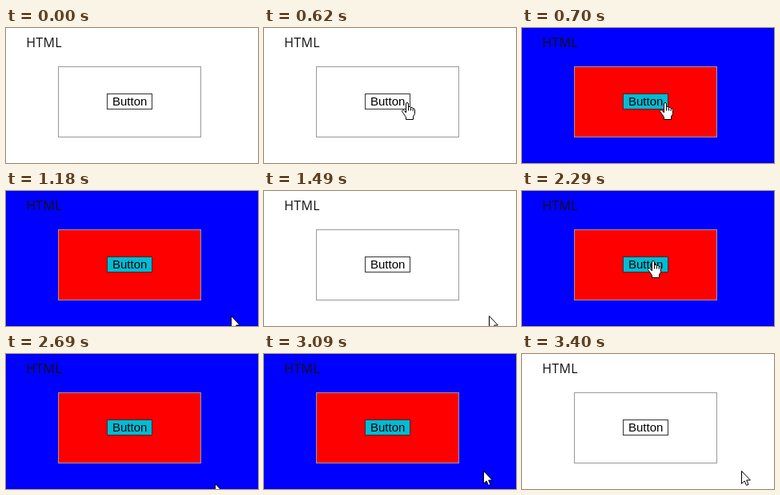
Animation, 315 px wide and 169 px high, one loop 3550 ms. Source, as an HTML page:

```html
<!DOCTYPE html>
<html lang="en">
<head>
<meta charset="utf-8">
<title>Button toggles colours</title>
<style>
  html, body { margin: 0; width: 100%; height: 100%; overflow: hidden; background: #fff; }
  svg { display: block; width: 315px; height: 169px; }
  .frame { fill: #fff; stroke: #999; }
  .button { fill: #fff; stroke: #333; }
  .label { font: 15px "Liberation Sans", Arial, sans-serif; fill: #000; }
  .title { font: 16px "Open Sans", "Noto Sans", sans-serif; letter-spacing: .3px; fill: #111; }
  .pointer path { fill: #fff; stroke: #000; stroke-linejoin: round; }
  #cursor, #arrow, #hand { opacity: 0; }
</style>
</head>
<body>
<svg viewBox="0 0 315 169">
  <rect id="page" width="315" height="169" fill="#fff"/>
  <text class="title" x="25.2" y="24">HTML</text>
  <rect id="frame" class="frame" x="65.5" y="48.5" width="178" height="88"/>
  <rect id="button" class="button" x="126.5" y="82.5" width="56" height="19"/>
  <text class="label" x="133" y="97">Button</text>
  <g id="cursor" class="pointer">
    <g id="arrow">
      <path d="M.5 .5V16.3L4.1 12.9L6.5 18.4L9 17.4L6.7 12H11.4Z"/>
    </g>
    <!-- The fingertip sits at the hot spot. -->
    <g id="hand" transform="translate(-5 0)">
      <path d="M5.5 13V2Q5.5 .5 7 .5T8.5 2V6.5Q8.8 5.3 10 5.3T11.5 6.8V7.2Q11.8 6.2 12.8 6.3T14.2 7.7V8.4Q14.5 7.6 15.3 7.8T16.5 9.3V14.5L14.5 18V21.5H5.5V18.6L2.2 13.8L.6 11.6Q.2 10.2 1.4 9.8T3.6 10.7Z"/>
      <path d="M8.5 6.5V10.5M11.5 7.2V10.5M14.2 8.4V11"/>
    </g>
  </g>
</svg>
<script>
const LOOP = 3550;

// Times at which the colours flip on or off.
const flips = [[0, 0], [700, 1], [1490, 0], [2290, 1], [3400, 0]];

// time, hot spot x, y, pointer kind
const moves = [
  [0, 229, 139, ''],
  [230, 229, 139, 'arrow'], [310, 193, 110, 'arrow'], [390, 177, 93, 'hand'],
  [860, 181, 96, 'hand'], [940, 204, 110, 'arrow'], [1020, 241, 132, 'arrow'],
  [1100, 269, 149, 'arrow'], [1180, 281, 156, 'arrow'],
  [1570, 276, 152, 'arrow'], [1650, 258, 139, 'arrow'], [1730, 229, 120, 'arrow'],
  [1810, 201, 104, 'arrow'], [1890, 181, 93, 'hand'], [1970, 172, 88, 'hand'],
  [2050, 166, 87, 'hand'], [2130, 162, 87, 'hand'],
  [2450, 205, 122, 'arrow'], [2530, 257, 164, 'arrow'],
  [2690, 261, 162, 'arrow'], [2770, 267, 157, 'arrow'], [2850, 272, 152, 'arrow'],
  [2930, 275, 148, 'arrow'], [3010, 275, 147, 'arrow'], [3090, 274, 146, 'arrow']
];

function play(id, table, style) {
  const frames = table.map(row => ({
    ...style(row), offset: row[0] / LOOP, easing: 'steps(1, end)'
  }));
  frames.push({ ...style(table[table.length - 1]), offset: 1 });
  const anim = document.getElementById(id)
    .animate(frames, { duration: LOOP, iterations: Infinity });
  anim.startTime = start;
}

const start = document.timeline.currentTime || 0;
const swap = (id, color) =>
  play(id, flips, ([, on]) => ({ fill: on ? color : '#fff' }));

swap('page', '#00f');
swap('frame', '#f00');
swap('button', '#00bcd4');

play('cursor', moves, ([, x, y, kind]) => ({
  transform: `translate(${x}px, ${y}px)`, opacity: kind ? 1 : 0
}));
for (const id of ['arrow', 'hand'])
  play(id, moves, ([, , , kind]) => ({ opacity: kind === id ? 1 : 0 }));
</script>
</body>
</html>
```
